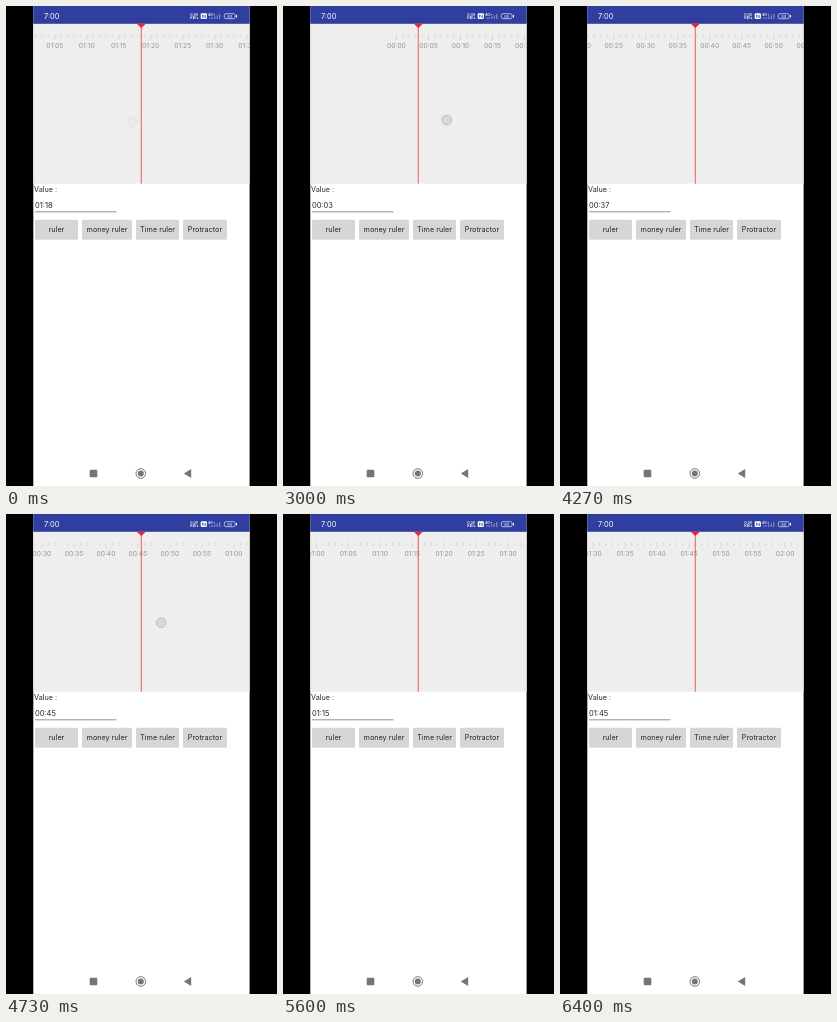
Recreate the animation shown at these times as an HTML page. Size 271 by 480 pixels, loop 6.47 s.

```html
<!DOCTYPE html>
<html lang="en">
<head>
<meta charset="utf-8">
<title>Time ruler</title>
<style>
  html, body { margin: 0; height: 100%; overflow: hidden; background: #000; }
  svg { display: block; width: 100vw; height: 100vh; font-family: Inter, sans-serif; }
  .label { font-size: 6.7px; fill: #959595; text-anchor: middle; }
  .form { font-size: 7.25px; fill: #262626; }
  .button { text-anchor: middle; }
  .tick { stroke: #cacaca; stroke-width: .6; }
</style>
</head>
<body>
<svg viewBox="0 0 271 480" preserveAspectRatio="none">
  <defs><clipPath id="screen"><rect x="27.3" width="216.3" height="480"/></clipPath></defs>
  <rect width="271" height="480" fill="#000"/>
  <g clip-path="url(#screen)">
    <rect x="27" width="217" height="480" fill="#fff"/>
    <rect x="27" y="17" width="217" height="160.7" fill="#eee"/>
    <rect x="27" width="217" height="17.8" fill="#303f9f"/>

    <g fill="#fff">
      <text x="38" y="13.1" font-size="7.4">7:00</text>
      <g font-size="3.5" font-weight="600">
        <text x="184.3" y="9.8">0.00</text>
        <text x="184.3" y="13.1">KB/s</text>
        <text x="202" y="10">4G+</text>
      </g>
      <rect x="194.7" y="7.3" width="6.2" height="5.8" rx="1"/>
      <path d="M196.5 11.8V8.8l2.8 3V8.8" fill="none" stroke="#303f9f" stroke-width=".7"/>
      <path d="M204 13v-1.5M206.2 13v-2M208.8 13v-2.7M211.2 13V9.3M213.8 13V8" stroke="#9fa8da" stroke-width=".9"/>
      <rect x="218.3" y="7.7" width="10.8" height="5" rx="1.6" fill="none" stroke="#e8eaf6" stroke-width=".7"/>
      <rect x="230" y="9" width="1" height="2.4"/>
      <text x="221.2" y="11.7" font-size="4">80</text>
    </g>

    <g id="money"></g>
    <g id="time"></g>
    <path d="M135.25 18V177.7" stroke="#ee4a4a" stroke-width=".9"/>
    <path d="M130.8 17.8h9l-4.5 4.2z" fill="#f5222d"/>

    <g class="form">
      <text x="28" y="186.2">Value :</text>
      <text id="value" x="29" y="202.2" font-size="7.5"></text>
      <path d="M29 205.8H110.5" stroke="#777" stroke-width=".8"/>
      <g id="buttons" class="button"></g>
    </g>

    <g fill="#757575">
      <rect x="83.7" y="463.7" width="7.6" height="7.6" rx="1"/>
      <circle cx="134.8" cy="467.5" r="4.8" fill="none" stroke="#757575" stroke-width="1"/>
      <circle cx="134.8" cy="467.5" r="3"/>
      <path d="M177.8 467.5l7.4-4.4v8.8z"/>
    </g>
    <circle id="finger" r="4.8" fill="#c8c9ce" fill-opacity=".55" stroke="#b0b1b6" stroke-width=".8"/>
  </g>
</svg>
<script>
const LOOP = 6470, STEP = 200 / 3, CENTER = 135.1, GAP = 6.4;
const el = id => document.getElementById(id);
const lerp = (a, b, p) => a + (b - a) * p;
const clamp = p => Math.min(1, Math.max(0, p));
const clock = v => [v / 60, v % 60].map(n => String(Math.floor(n)).padStart(2, '0')).join(':');

function buildRuler(id, count, major, label) {
  let markup = '';
  for (let i = 0; i <= count; i++) {
    const x = i * GAP, isMajor = i % major === 0;
    markup += `<path class="tick" d="M${x} 28.5V${isMajor ? 34 : 31.8}"/>`;
    if (isMajor) markup += `<text class="label" x="${x}" y="41.5">${label(i)}</text>`;
  }
  el(id).innerHTML = markup;
}
buildRuler('money', 120, 10, i => i * 100);
buildRuler('time', 140, 5, clock);
el('money').setAttribute('transform', `translate(${CENTER - 92 * GAP})`);

el('buttons').innerHTML = [
  ['ruler', 29, 43], ['money ruler', 76, 50], ['Time ruler', 130, 43], ['Protractor', 177, 44]
].map(([name, x, w]) => `
  <rect x="${x}" y="214.3" width="${w}" height="19.5" rx="1.4" fill="#bdbdbd" opacity=".6"/>
  <rect class="face" x="${x}" y="213.8" width="${w}" height="19.3" rx="1.4" fill="#d6d6d6"/>
  <text x="${x + w / 2}" y="226.2">${name}</text>`).join('');
const timeButton = document.querySelectorAll('.face')[2];

// Each swipe drags the ruler with the finger, then coasts to rest.
const swipes = [
  { start: 2933, rest: 3600, from: 0, mid: 10.1, to: 19, x: 185.5, y: [114, 114] },
  { start: 3870, rest: 4400, from: 19, mid: 31, to: 38.5, x: 200, y: [100, 114] },
  { start: 4600, rest: 5130, from: 38.5, mid: 49, to: 56.95, x: 200, y: [98, 114] },
  { start: 5267, rest: 5800, from: 56.95, mid: 69.3, to: 78.5, x: 205, y: [95, 116] },
  { start: 5867, rest: 6450, from: 78.5, mid: 91.9, to: 106.02, x: 205, y: [95, 112] }
];
const DRAG = 200, FADE = 130;

function swipeValue(s, t) {
  if (t < s.start + DRAG) return lerp(s.from, s.mid, clamp((t - s.start) / DRAG));
  const p = clamp((t - s.start - DRAG) / (s.rest - s.start - DRAG));
  return s.to - (s.to - s.mid) * (1 - p) ** 2.5;
}

function showFinger(x, y, opacity) {
  const finger = el('finger');
  finger.setAttribute('cx', x);
  finger.setAttribute('cy', y);
  finger.setAttribute('opacity', opacity);
}

function render(t) {
  const opening = t < STEP - 1;
  const swipe = swipes.findLast(s => t >= s.start - STEP - 1);
  const value = opening ? 78.5 : swipe ? swipeValue(swipe, t) : 0;
  const money = !opening && t < 930;

  el('money').style.display = money ? '' : 'none';
  el('time').style.display = money ? 'none' : '';
  el('time').setAttribute('transform', `translate(${CENTER - value * GAP})`);
  el('value').textContent = opening || swipe ? clock(value) : '9200';

  const press = t < 1530 ? clamp((t - 670) / 270) : 0;
  const shade = Math.round(lerp(214, 190, press));
  timeButton.setAttribute('fill', `rgb(${shade},${shade},${shade})`);

  if (opening) showFinger(126.8, 116, .25);
  else if (swipe) {
    const p = clamp((t - swipe.start) / DRAG);
    showFinger(swipe.x - (swipe.mid - swipe.from) * GAP * p, lerp(...swipe.y, p),
      1 - clamp((t - swipe.start - DRAG) / FADE));
  } else showFinger(151, 223, t < 730 ? 0 : 1 - clamp((t - 800) / FADE));
}

function tick() {
  const t = performance.now() % LOOP;
  render(Math.min(96, Math.floor((t + 4) / STEP)) * STEP);
  requestAnimationFrame(tick);
}
tick();
</script>
</body>
</html>
```
